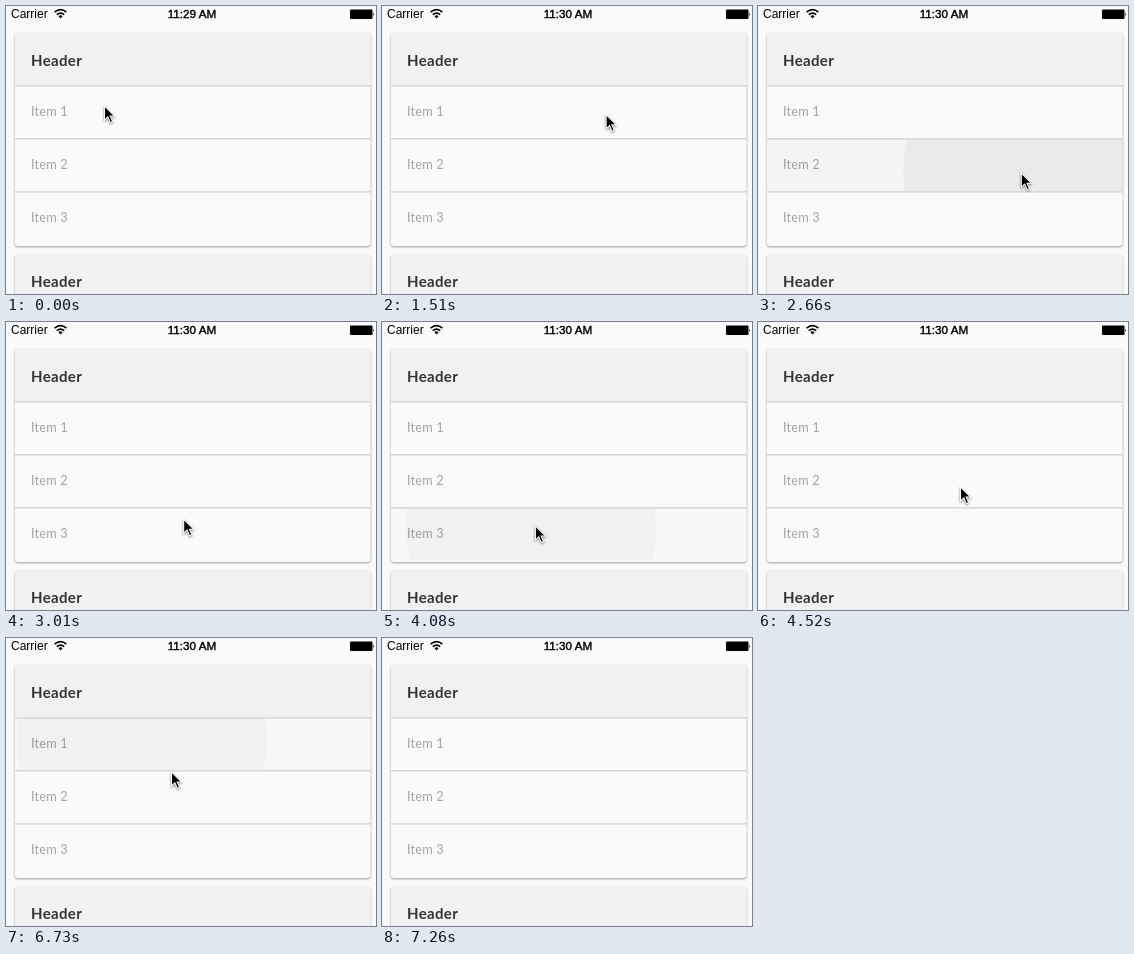
Animation of 370 by 288 pixels, one loop 7.72 s. Source, as an HTML page:

```html
<!DOCTYPE html>
<html lang="en">
<head>
<meta charset="utf-8">
<title>Ripple list</title>
<style>
  html, body { margin: 0; width: 100%; height: 100%; overflow: hidden; background: #fafafa; }
  svg { display: block; }
  .status { font: 12px "Liberation Sans", Arial, sans-serif; }
  .time { font-size: 11.7px; text-anchor: middle; stroke: #000; stroke-width: .4; }
  .header { font: bold 15px Lato, sans-serif; letter-spacing: .35px; fill: #333; }
  .item { font: 12.7px Lato, sans-serif; letter-spacing: .2px; fill: #a2a2a2; }
  .card { fill: #fafafa; filter: drop-shadow(0 1px 1px rgba(0, 0, 0, .38)); }
  .arc { fill: none; stroke: #000; stroke-width: 1.7; }
</style>
</head>
<body>
<svg width="370" height="288" viewBox="0 0 370 288">
  <defs>
    <clipPath id="row"><rect id="rowBox" x="9" width="355.5" height="51.4"/></clipPath>
  </defs>

  <g class="status">
    <text x="5" y="12.2">Carrier</text>
    <text id="clock" class="time" x="186" y="12.2"></text>
  </g>
  <path class="arc" d="M48.6 6.2Q54.5 1.2 60.4 6.2M50.8 8.7Q54.5 5.6 58.2 8.7"/>
  <path d="M52.3 10Q54.5 8.4 56.7 10L54.5 12.4Z"/>
  <rect x="344" y="3.5" width="22.5" height="9.5" rx="1"/>
  <path d="M367 6.4q1.8 1.8 0 3.6z"/>

  <g id="cards"></g>

  <g clip-path="url(#row)">
    <rect id="tint" x="9" y="27" width="356" height="213"/>
    <circle id="ripple"/>
  </g>

  <g id="cursor">
    <path d="M0 0V16.2L3.7 12.7L6.2 18.2L9.2 17L6.8 11.6H11.6Z" fill="#fff"
      style="filter: drop-shadow(0 1px 1px rgba(0, 0, 0, .5))"/>
    <path d="M1 2.3V13.8L4 11L6.6 16.9L7.9 16.3L5.4 10.6H9.3Z"/>
  </g>
</svg>
<script>
const LOOP = 7720, STEP = 88.5, ROW = 53;
const $ = id => document.getElementById(id);
const set = (el, attrs) => { for (const k in attrs) el.setAttribute(k, attrs[k]); };
const clamp = u => Math.max(0, Math.min(1, u));
const smooth = u => u * u * (3 - 2 * u);

// Pointer moves in steps; bendX and bendY curve the way
const home = [98, 99];
const moves = [
  { from: 14, to: 22, x: 269, y: 164, bendX: 0.42, bendY: 1.5 },
  { from: 29, to: 36.3, x: 149, y: 206 },
  { from: 45, to: 51, x: 202, y: 164 },
  { from: 58, to: 63, x: 136, y: 102 },
  { from: 74, to: 82, x: 322, y: 300 }
];
const taps = [{ at: 9, row: 0 }, { at: 26, row: 1 }, { at: 41, row: 2 }, { at: 54, row: 1 }, { at: 71, row: 0 }];

function card(y) {
  let s = `<rect class="card" x="9" y="${y}" width="355.5" height="213" rx="3"/>
    <path d="M9 ${y + 52}v-49q0-3 3-3h349.5q3 0 3 3v49z" fill="#f1f1f1"/>
    <text class="header" x="25" y="${y + 32.6}">Header</text>`;
  for (let i = 0; i < 3; i++) {
    const top = y + 52 + i * ROW;
    s += `<rect x="9" y="${top}" width="355.5" height="1.6" fill="#d8d8d8"/>
      <text class="item" x="25" y="${top + 31}">Item ${i + 1}</text>`;
  }
  return s;
}
$("cards").innerHTML = card(27) + card(248.4);

function pointer(n) {
  let [px, py] = home;
  for (const { from, to, x, y, bendX = 1, bendY = 1 } of moves) {
    const u = clamp((n - from) / (to - from));
    px += (x - px) * smooth(u ** bendX);
    py += (y - py) * smooth(u ** bendY);
  }
  return [px, py];
}

function draw(now) {
  const n = Math.floor((now % LOOP) / STEP);
  $("clock").textContent = n < 1 ? "11:29 AM" : "11:30 AM";
  set($("cursor"), { transform: `translate(${pointer(n)})` });

  const tap = taps.filter(t => t.at <= n).pop();
  let alpha = 0;
  if (tap) {
    const age = (n - tap.at) * STEP;
    const [cx, cy] = pointer(tap.at);
    alpha = clamp((560 - age) / 340);
    set($("rowBox"), { y: 80.6 + tap.row * ROW });
    set($("ripple"), { cx, cy: cy + 1, r: 125 * (1 - (1 - clamp(age / 450)) ** 3) });
  }
  set($("tint"), { opacity: 0.036 * alpha });
  set($("ripple"), { opacity: 0.072 * alpha });
}

const start = performance.now();
function loop() {
  draw(performance.now() - start);
  requestAnimationFrame(loop);
}
loop();
</script>
</body>
</html>
```
